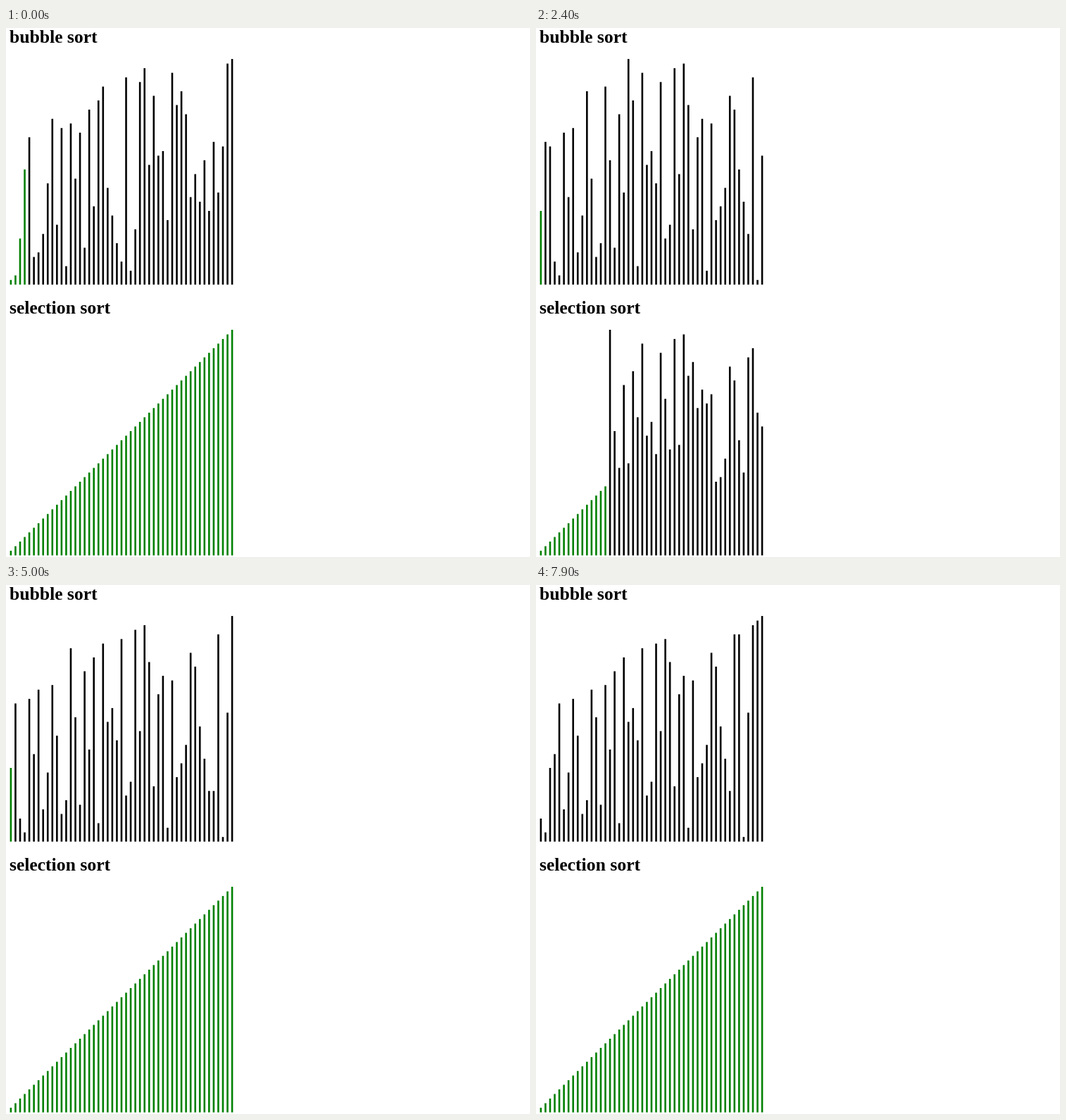
Write a matplotlib script that moves like this. It is 744 by 752 pixels and loops after 8 s.

```python
import matplotlib.pyplot as plt
import numpy as np
from matplotlib.animation import FuncAnimation

W, H, DPI = 744, 752, 100
N = 49
UNIT = 6.545            # bar spacing and height per value
LEFT, BAR_W = 5.6, 2.6
STEP_MS, LOOP_MS = 100, 8000
RESTART_MS = 1800       # moment at which both arrays are shuffled again

OLD = [1, 2, 10, 25, 32, 6, 7, 11, 22, 36, 13, 34, 4, 35, 23, 33, 8, 38, 17,
       40, 43, 21, 15, 9, 5, 45, 3, 12, 44, 47, 26, 41, 28, 29, 14, 46, 39,
       42, 37, 19, 24, 18, 27, 16, 31, 20, 30, 48, 49]
NEW = [31, 16, 33, 30, 5, 2, 34, 19, 43, 7, 15, 42, 23, 6, 9, 49, 27, 8, 37,
       20, 40, 4, 46, 26, 29, 22, 44, 10, 13, 47, 24, 48, 39, 12, 32, 36, 3,
       35, 14, 17, 21, 41, 38, 25, 18, 11, 45, 1, 28]


def swap(a, i, k, states):
    """Swap through a temporary, recording the half-done state as well."""
    kept = a[i]
    a[i] = a[k]
    states.append(a[:])
    a[k] = kept
    states.append(a[:])


def bubble_states(values, first=0):
    a, states = values[:], [values[:]]
    for _ in range(6):
        for j in range(first, N - 1):
            if a[j] > a[j + 1]:
                swap(a, j, j + 1, states)
        first = 0
    return states


def selection_states(values):
    a, states = values[:], [values[:]]
    for i in range(N):
        swap(a, i, a.index(min(a[i:]), i), states)
    return states


OLD_BUBBLE = bubble_states(OLD, first=20)
NEW_BUBBLE = bubble_states(NEW)
NEW_SELECTION = selection_states(NEW)
SORTED = list(range(1, N + 1))

# The screen refreshes steadily at first, then with skipped ticks.
REFRESH = list(range(0, 2500, 100)) + [
    2900, 3000, 3200, 3300, 3500, 3600, 3800,
    4000, 4200, 4300, 4500, 4700, 4800, 5000,
    5200, 5400, 5500, 5700,
    6000, 6200, 6300, 6500, 6700, 6900,
    7100, 7300, 7500, 7700, 7900]


def pick(states, swaps):
    return states[min(int(2 * swaps), len(states) - 1)]


def arrays_at(ms):
    """Both arrays at a time; one swap takes about 40 ms."""
    shown = max(t for t in REFRESH if t <= ms)
    if shown < RESTART_MS:
        return pick(OLD_BUBBLE, 0.2 + shown * 34.5 / 1400), SORTED
    swaps = np.interp(shown, [RESTART_MS, 2400, 3800, 5000, 6500, 7900],
                      [0, 15.2, 50.7, 79.7, 118.7, 152.7])
    return pick(NEW_BUBBLE, swaps), pick(NEW_SELECTION, swaps)


def paint(bars, values):
    ordered = True
    for i, (bar, value) in enumerate(zip(bars, values)):
        ordered = ordered and (i == N - 1 or value <= values[i + 1])
        bar.set_height(-value * UNIT)
        bar.set_facecolor("green" if ordered else "black")


fig = plt.figure(figsize=(W / DPI, H / DPI), dpi=DPI, facecolor="white")
ax = fig.add_axes([0, 0, 1, 1])
ax.axis("off")


def make_chart(title, baseline, bottom):
    ax.text(5.4, baseline, title, family="Liberation Serif", weight="bold",
            size=25.6 * 72 / DPI, color="black", va="baseline")
    bars = ax.bar(LEFT + UNIT * np.arange(N), [-UNIT] * N, BAR_W,
                  bottom=bottom, align="edge", linewidth=0)
    for bar in bars:
        bar.set_snap(False)
    return bars


charts = [make_chart("bubble sort", 21, 364.75),
          make_chart("selection sort", 406, 749.7)]
ax.set_xlim(0, W)
ax.set_ylim(H, 0)


def update(frame):
    for bars, values in zip(charts, arrays_at(frame * STEP_MS)):
        paint(bars, values)
    return [bar for bars in charts for bar in bars]


anim = FuncAnimation(fig, update, frames=LOOP_MS // STEP_MS, interval=STEP_MS,
                     repeat=True, repeat_delay=0, blit=False)
plt.show()
```
